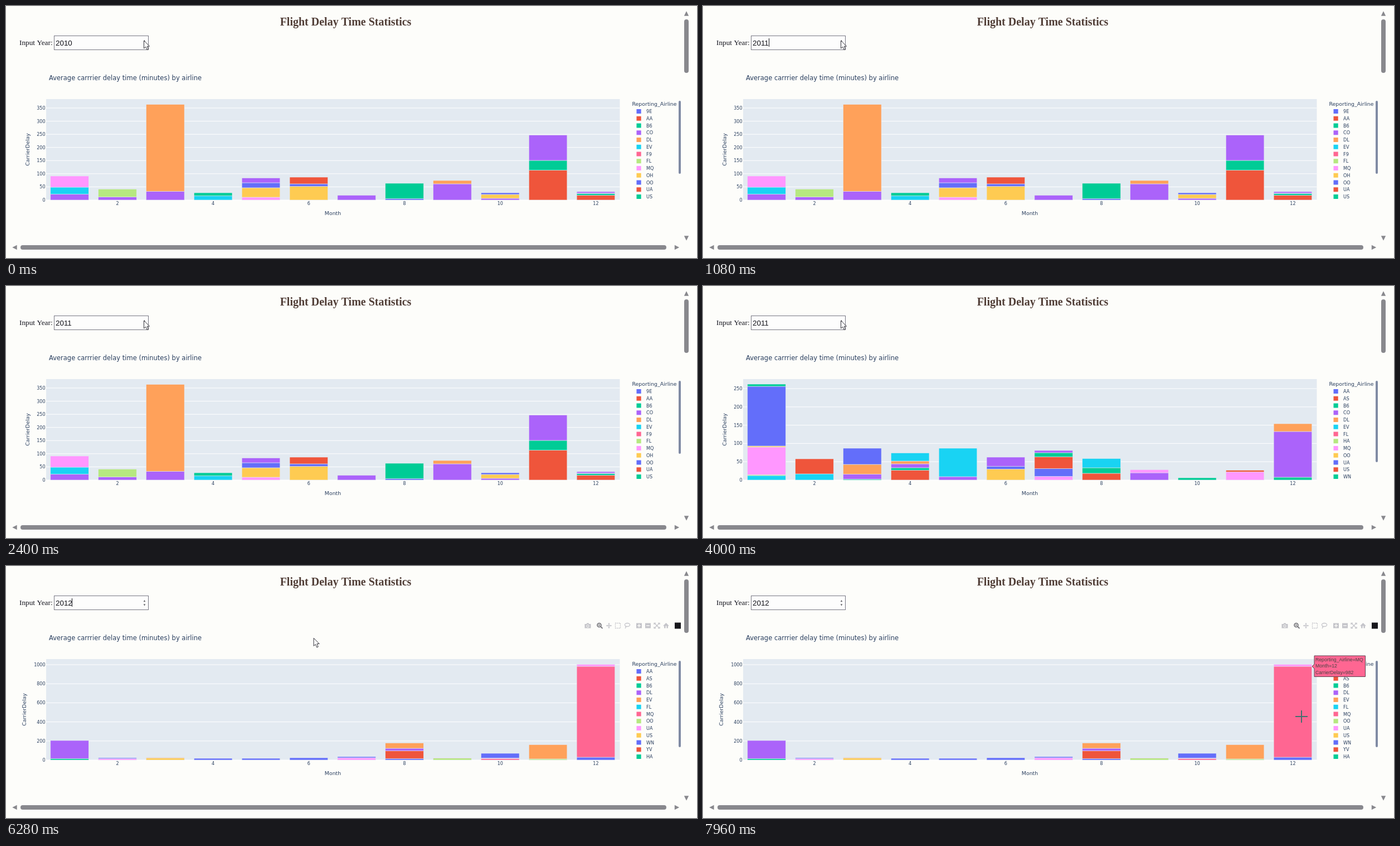
Animation, 1240 px wide and 452 px high, one loop 8 s. Source, as an HTML page with a canvas:

```html
<!DOCTYPE html>
<html lang="en">
<head>
<meta charset="utf-8">
<title>Flight Delay Time Statistics</title>
<style>
html, body { margin: 0; width: 100%; height: 100%; overflow: hidden; background: #fdfdfa; }
canvas { display: block; width: 1240px; height: 452px; }
</style>
</head>
<body>
<canvas id="stage" width="1240" height="452"></canvas>
<script>
const ctx = document.getElementById('stage').getContext('2d');
const LOOP = 8000;
const SANS = '"DejaVu Sans", sans-serif';
const ARIAL = '"Liberation Sans", Arial, sans-serif';
const SERIF = '"Liberation Serif", "Times New Roman", serif';
const INK = '#2a3f5f';
const PAGE = '#fdfdfa';
const PLOT_BG = '#e3eaf1';
const PLOT = { left: 72, right: 1101.5, top: 167, base: 348 };

// Blue, Red, Green, Purple, Orange, Cyan, Hot pink, Lime, pinK, Yellow
const PALETTE = {
  B: '#636efa', R: '#ef553b', G: '#00cc96', P: '#ab63fa', O: '#ffa15a',
  C: '#19d3f3', H: '#ff6692', L: '#b6e880', K: '#ff97ff', Y: '#fecb52'
};
const COLORWAY = Object.values(PALETTE);

// Each month is a stack of colour + height, from the baseline up.
const CHARTS = [
  {
    from: 0, step: 50, max: 350, unit: 0.4714, labelX: 39, thumbEnd: 301,
    legend: '9E AA B6 CO DL EV F9 FL MQ OH OO UA US',
    bars: 'P10.4 C12.6 K20|P5.5 L14|P15.5 O156|C7.5 G5.5|K5 Y17 B9 P8.5|Y24.5 B4.5 R12|' +
      'P8.5|B2.5 G27.5|P29 O6|P3 Y7 B3|R53.5 G17.5 P45.5|R8.5 G3 B1 P2.5'
  },
  {
    from: 4000, step: 50, max: 250, unit: 0.656, labelX: 39, thumbEnd: 316,
    legend: 'AA AS B6 CO DL EV FL HA MQ OO UA US WN',
    bars: 'C8 L1.5 K49.5 Y2 B107 G4|C11 R27|G1.5 P9 O17.5 B29|R17.5 G4.5 P7 O5 C14.5|P6 C51|' +
      'Y19.5 B5 P16.5|K6.5 B14 R21 G7.5 P4|R12 G10 C16.5|P13 K5.5|G4|K14.5 R3|G5 P82 O14'
  },
  {
    from: 5520, step: 200, max: 1000, unit: 0.171, labelX: 33, thumbEnd: 325,
    legend: 'AA AS B6 DL EV FL MQ OO UA US WN YV HA',
    bars: 'G2.5 P32.5|K2.5 B1.5|Y3.5 O1|B3|B3|B4|K4 B2|B2.5 R14 P4.5 O9.5|' +
      'L3.5 K.5|H2.5 K1 B8.5|L2 O25.5|B5 H163 K3.5'
  }
];
const YEARS = [[0, '2010'], [400, '2011'], [4240, '2012']];
const CARET = [[400, 1360], [1880, 2400], [2920, 3440], [4240, 4920],
  [5480, 5760], [6280, 6800], [7320, 7840]];
const POINTER = [[0, 247.5, 62], [5200, 247.5, 62], [5440, 303.5, 115], [6280, 551.5, 129],
  [6480, 690, 200], [7080, 1090, 268], [7320, 1090, 268], [7520, 1086, 267],
  [7840, 1086, 267], [7960, 1074, 270]];

function rect(x, y, w, h, color) {
  ctx.fillStyle = color;
  ctx.fillRect(x, y, w, h);
}

function pill(x, y, w, h, color) {
  ctx.fillStyle = color;
  ctx.beginPath();
  ctx.roundRect(x, y, w, h, Math.min(w, h) / 2);
  ctx.fill();
}

function text(str, x, y, font, color = INK, align = 'left') {
  ctx.font = font;
  ctx.fillStyle = color;
  ctx.textAlign = align;
  ctx.fillText(str, x, y);
}

function path(points, close = true) {
  ctx.beginPath();
  points.forEach(([x, y], i) => i ? ctx.lineTo(x, y) : ctx.moveTo(x, y));
  if (close) ctx.closePath();
}

function triangle(x, y, r, dx, dy, color) {
  ctx.fillStyle = color;
  path([[x + dx * r, y + dy * r], [x - dx * r + dy * r, y - dy * r + dx * r],
    [x - dx * r - dy * r, y - dy * r - dx * r]]);
  ctx.fill();
}

function pointerAt(t) {
  const i = POINTER.findIndex(p => p[0] > t);
  if (i < 0) return POINTER[POINTER.length - 1].slice(1);
  const [a, b] = [POINTER[i - 1], POINTER[i]];
  const k = (t - a[0]) / (b[0] - a[0]);
  return [a[1] + (b[1] - a[1]) * k, a[2] + (b[2] - a[2]) * k];
}

function drawScrollbars() {
  const gray = '#88888d';
  pill(1217, 24, 8, 96, gray);
  pill(26, 429, 1159, 8, gray);
  triangle(1221, 13.5, 4.2, 0, -1, gray);
  triangle(1221, 416.5, 4.2, 0, 1, gray);
  triangle(15.5, 433, 4.2, -1, 0, gray);
  triangle(1204, 433, 4.2, 1, 0, gray);
}

function drawForm(t) {
  text('Flight Delay Time Statistics', 609.5, 34.5, 'bold 20px ' + SERIF, '#503d36', 'center');
  text('Input Year:', 24, 70, '13.3px ' + SERIF, '#15151f');
  ctx.fillStyle = '#fdfdfd';
  ctx.strokeStyle = '#777783';
  ctx.lineWidth = 1;
  ctx.fillRect(87, 53.5, 168.5, 25);
  ctx.strokeRect(86.5, 53.5, 169, 25);
  const year = YEARS.filter(y => y[0] <= t).pop()[1];
  text(year, 89, 70.5, '13.4px ' + ARIAL, '#111118');
  if (CARET.some(([on, off]) => t >= on && t < off)) rect(118, 58, 1, 15, '#111118');
  triangle(248.5, 62.5, 1.8, 0, -1, '#68686c');
  triangle(248.5, 70, 1.8, 0, 1, '#68686c');
}

function drawChart(chart) {
  const { left, right, top, base } = PLOT;
  text('Average carrrier delay time (minutes) by airline', 77, 133, '11.5px ' + SANS);
  rect(left, top, right - left, base - top, PLOT_BG);
  for (let v = 0; v <= chart.max; v += chart.step) {
    const y = base - v * chart.unit;
    rect(left, y - 0.5, right - left, v ? 1 : 1.5, '#fff');
    text(v, 70.5, y + 3, '8px ' + SANS, INK, 'right');
  }
  ctx.strokeStyle = PLOT_BG;
  ctx.lineWidth = 0.6;
  chart.bars.split('|').forEach((stack, m) => {
    const x = 79.8 + m * 85.85;
    let y = base;
    stack.split(' ').forEach(part => {
      const h = +part.slice(1);
      y -= h;
      rect(x, y, 68.6, h, PALETTE[part[0]]);
      ctx.strokeRect(x, y, 68.6, h);
    });
    if (m % 2) text(m + 1, x + 34.3, 356.7, '8px ' + SANS, INK, 'center');
  });
  text('Month', 586.5, 374.5, '9.35px ' + SANS, INK, 'center');
  ctx.save();
  ctx.translate(chart.labelX + 3.2, 257.5);
  ctx.rotate(-Math.PI / 2);
  text('CarrierDelay', 0, 0, '9.35px ' + SANS, INK, 'center');
  ctx.restore();

  text('Reporting_Airline', 1123.5, 179.3, '9.4px ' + SANS);
  chart.legend.split(' ').forEach((code, i) => {
    const y = 189 + i * 12.75;
    rect(1131.5, y - 4, 8.2, 8, COLORWAY[i % 10]);
    text(code, 1149, y + 3, '8.1px ' + SANS);
  });
  pill(1207, 170, 4, chart.thumbEnd - 170, '#808ba4');
}

function drawModebar(alpha) {
  if (alpha <= 0) return;
  ctx.save();
  ctx.globalAlpha = alpha;
  const pale = '#c5c5ca', dark = '#77777c', y = 107;
  const line = (...points) => { path(points, false); ctx.stroke(); };
  const ring = (x, cy, rx, ry) => {
    ctx.beginPath();
    ctx.ellipse(x, cy, rx, ry, 0, 0, 7);
    ctx.stroke();
  };
  // camera
  rect(1038.5, 104, 11, 7.5, pale);
  rect(1042, 102.5, 4, 2, pale);
  ctx.strokeStyle = PAGE;
  ctx.lineWidth = 1;
  ring(1044, 107.7, 2.2, 2.2);
  // zoom
  ctx.strokeStyle = dark;
  ctx.lineWidth = 1.8;
  ring(1064.5, 106, 3.4, 3.4);
  line([1067, 108.5], [1070.5, 112]);
  line([1063, 106], [1066, 106]);
  // pan
  ctx.strokeStyle = pale;
  ctx.lineWidth = 1.3;
  line([1078, y], [1086, y]);
  line([1082, y - 4], [1082, y + 4]);
  for (const [dx, dy] of [[1, 0], [-1, 0], [0, 1], [0, -1]])
    triangle(1082 + dx * 4, y + dy * 4, 1.6, dx, dy, pale);
  // box select and lasso
  ctx.setLineDash([2, 1.2]);
  ctx.strokeRect(1093.5, 102.5, 9, 9);
  ctx.setLineDash([]);
  ring(1115, 105.5, 4.6, 3);
  line([1111.5, 107.5], [1112.5, 109.5], [1111, 112]);
  // zoom in and out
  for (const x of [1136, 1152]) {
    rect(x - 5, y - 4.5, 10, 9, pale);
    rect(x - 3, y - 0.7, 6, 1.4, PAGE);
  }
  rect(1135.3, y - 3, 1.4, 6, PAGE);
  // autoscale
  line([1164, 103], [1172, 111]);
  line([1172, 103], [1164, 111]);
  for (const [dx, dy] of [[1, 1], [1, -1], [-1, 1], [-1, -1]])
    line([1168 + dx * 2, y + dy * 4.5], [1168 + dx * 5, y + dy * 4.5], [1168 + dx * 5, y + dy * 2]);
  // home
  path([[1179, 107.5], [1184.5, 102], [1190, 107.5]]);
  ctx.fillStyle = pale;
  ctx.fill();
  rect(1181, 107, 2.6, 4.5, pale);
  rect(1185.4, 107, 2.6, 4.5, pale);
  rect(1200, 101.5, 11, 11, '#17171c');
  ctx.restore();
}

function drawTooltip() {
  path([[1093, 180], [1097, 176], [1097, 161], [1188.5, 161],
    [1188.5, 198.5], [1097, 198.5], [1097, 184]]);
  ctx.fillStyle = PALETTE.H;
  ctx.fill();
  ctx.strokeStyle = '#5b4450';
  ctx.lineWidth = 1;
  ctx.stroke();
  ['Reporting_Airline=MQ', 'Month=12', 'CarrierDelay=982'].forEach((s, i) =>
    text(s, 1099, 171.3 + i * 11.1, '8.7px ' + ARIAL, '#444'));
}

function drawPointer(x, y) {
  const { left, right, top, base } = PLOT;
  if (x > left && x < right && y > top && y < base) {
    const teal = '#42706f';
    rect(x - 11, y - 1, 22, 2, teal);
    rect(x - 1, y - 11, 2, 22, teal);
    return;
  }
  path([[0, 0], [0, 14], [3.3, 11.2], [5.6, 16.6], [8, 15.6], [5.8, 10.2], [10, 10.2]]
    .map(([dx, dy]) => [x + dx, y + dy]));
  ctx.fillStyle = '#fff';
  ctx.strokeStyle = '#33333a';
  ctx.lineWidth = 1;
  ctx.fill();
  ctx.stroke();
}

function draw(t) {
  rect(0, 0, 1240, 452, PAGE);
  drawScrollbars();
  drawForm(t);
  drawChart(CHARTS.filter(c => c.from <= t).pop());
  drawModebar(Math.min(1, (t - 5480) / 300));
  const [x, y] = pointerAt(t);
  if (x > 1024 && y > 180) drawTooltip();
  drawPointer(x, y);
}

const start = performance.now();
function tick() {
  draw((performance.now() - start) % LOOP);
  requestAnimationFrame(tick);
}
tick();
</script>
</body>
</html>
```
